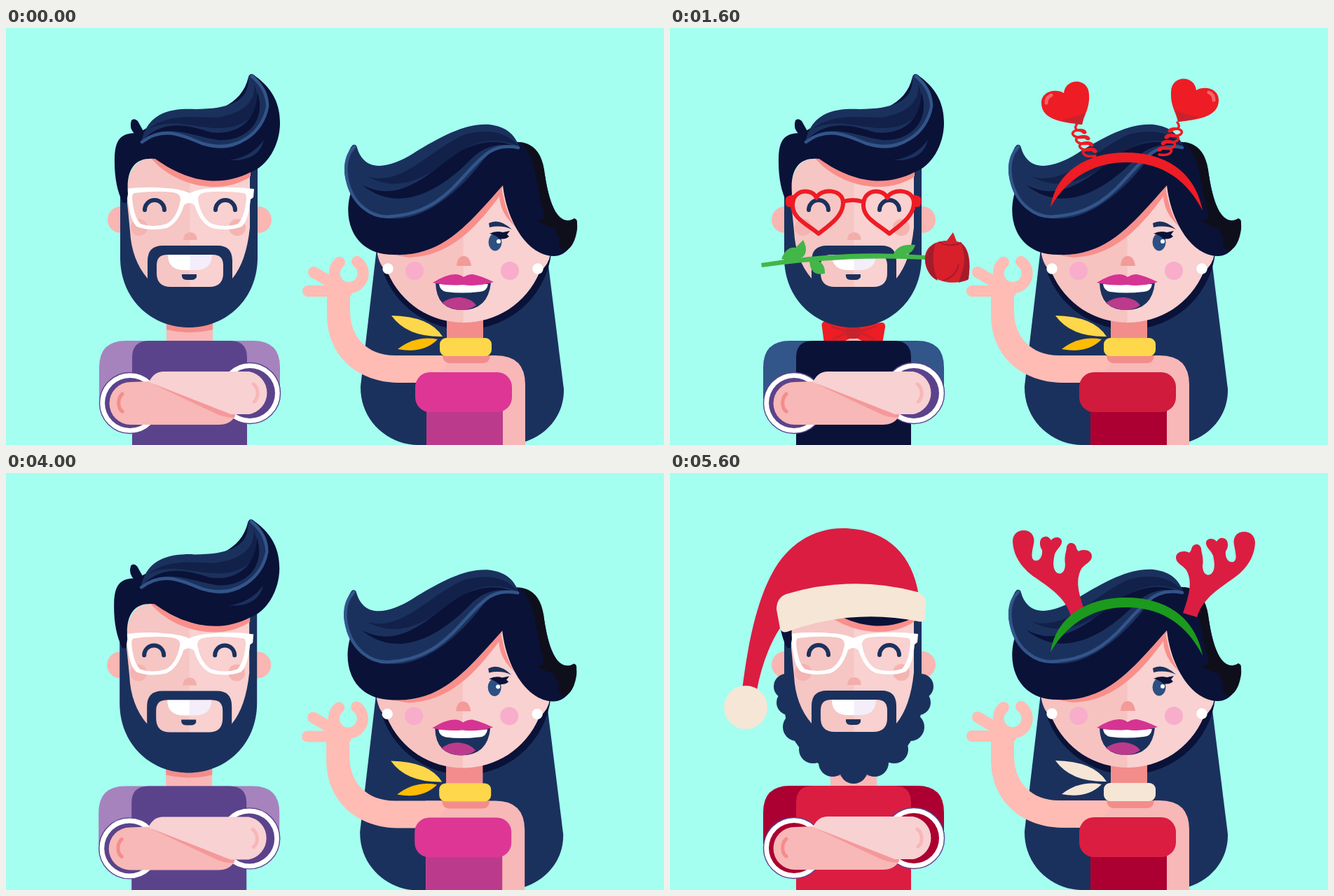
Write an HTML page that moves like this. It is 939 px wide and 596 px high and loops after 6400 ms.

```html
<!DOCTYPE html>
<html lang="en">
<head>
<meta charset="utf-8">
<title>Festive couple</title>
<style>
html, body { margin: 0; width: 100%; height: 100%; overflow: hidden; background: #a4fff0; }
svg { display: block; width: 939px; height: 596px; }
.line { fill: none; stroke-linecap: round; stroke-linejoin: round; }
.p { display: none; }
.s0 .on0, .s1 .on1, .s2 .on2, .s3 .on3, .s4 .on4, .s5 .on5 { display: inline; }
svg { --shirt: #5b438c; --sleeve: #a683bd; --cuff: #5b438c; --rim: #5b438c;
  --bust: #de3694; --dress: #bc3a8c; --scarf: #ffd74a; --scarf2: #ffbc05; --band: #ee1c24; }
.s1 { --shirt: #fff; --sleeve: #d3f5fe; --cuff: #1b315d; --rim: #1b315d; --dress: #de3694; --scarf: #00b2ae; --fold: #00b2ae; --dot: #de3694; }
.s2 { --shirt: #0a1238; --sleeve: #32558a; --bust: #d01b3c; --dress: #ab0031; }
.s3 { --shirt: #fff; --sleeve: #005b30; --bust: #fff; --dress: #e6fdff; --scarf: #f15a24; --fold: #dd4510; --dot: #f15a24; }
.s5 { --shirt: #db1d42; --sleeve: #ab0031; --cuff: #ab0031; --bust: #db1d42; --dress: #ab0031; --scarf: #f6e6d6; --scarf2: #f6e6d6; --band: #1b9a1e; }
.s1 #hair, .s3 #hair { clip-path: url(#underHat); }
.s5 #hair { clip-path: url(#underBrim); }
</style>
</head>
<body>
<svg id="stage" class="s0" viewBox="0 0 939 596">
<defs>
  <linearGradient id="skinM" gradientUnits="userSpaceOnUse" x1="262" x2="263" y1="0" y2="0"><stop stop-color="#f5c6c4"/><stop offset="1" stop-color="#f8d1d0"/></linearGradient>
  <linearGradient id="skinW" gradientUnits="userSpaceOnUse" x1="652" x2="653" y1="0" y2="0"><stop stop-color="#f6c3c1"/><stop offset="1" stop-color="#f8d1d0"/></linearGradient>
  <linearGradient id="teeth" gradientUnits="userSpaceOnUse" x1="262" x2="263" y1="0" y2="0"><stop stop-color="#fff"/><stop offset="1" stop-color="#f3eef9"/></linearGradient>
  <clipPath id="underHat"><path d="M0 160H359V300H0Z"/></clipPath>
  <clipPath id="underBrim"><path d="M0 190H359V300H0Z"/></clipPath>
  <path id="heart" d="M200 244C194 225 156 226 156 256C156 277 180 288 204 302C227 288 246 275 246 252C246 223 207 224 200 244Z"/>
  <clipPath id="lensClip"><use href="#heart"/></clipPath>
  <g id="lens">
    <use href="#heart" fill="#6b3627"/>
    <g clip-path="url(#lensClip)"><path d="M150 286L213 223H232L157 300ZM187 305L250 237V260L199 311Z" fill="#8f5743"/></g>
    <use href="#heart" fill="none" stroke="#ffd33f" stroke-width="6"/>
    <text x="170 192" y="280" font-family="Noto Sans, sans-serif" font-weight="700" font-size="44" fill="#c92f1b" stroke="#f0602a" stroke-width="1.4">12</text>
    <path class="line" d="M184.600 252V278M197 256Q200 252 205 252Q215 255 209 264L197 277H214" stroke="#ffcf5e" stroke-width="2.2" stroke-dasharray="0 4.6"/>
  </g>
  <g id="shades">
    <path class="line" d="M246 252Q260 246 274 252" stroke="#f9a62b" stroke-width="7"/>
    <use href="#lens"/><use href="#lens" x="117"/>
  </g>
  <g id="crown">
    <path d="M135 138Q160 148 176 139L183 90H188Q205 112 226 111L252 77H257L273 116Q225 162 160 177Z" fill="#ffd33f"/>
    <path d="M185 90H188Q205 112 226 111L233 147L203 163Z" fill="#ffbc05"/>
    <path d="M157 175Q222 160 271 114L277 136Q234 180 167 193Z" fill="#5e0a1e"/>
    <g fill="#fb4d5e"><circle cx="173" cy="183" r="4"/><circle cx="187" cy="180" r="5.5"/><circle cx="204" cy="174" r="6.5"/><circle cx="222" cy="166" r="6.5"/><circle cx="239" cy="156" r="6"/><circle cx="254" cy="146" r="5"/><circle cx="267" cy="134" r="4"/></g>
    <g fill="#6c0a25"><circle cx="133" cy="132" r="8.5"/><circle cx="186" cy="86" r="8.5"/><circle cx="253" cy="70" r="8.5"/></g>
    <g fill="#fff"><circle cx="187" cy="125" r="5"/><circle cx="183" cy="136" r="3"/><circle cx="246" cy="102" r="3.8"/><circle cx="241" cy="111" r="2.6"/></g>
  </g>
  <g id="rosette">
    <circle r="16.5" fill="#fff" stroke="#f9d5b5" stroke-width="9"/>
    <circle class="line" r="17.5" stroke="#f47b2a" stroke-width="7.5" stroke-dasharray="0 5.5"/>
    <circle r="13" fill="#fff"/>
    <circle r="9.5" fill="#005b30" stroke="#005b30" stroke-width="2" stroke-dasharray="2 2"/>
  </g>
  <g id="drops">
    <path d="M-7 10V18M0 12V25M7 10V18" stroke="#f5a623" stroke-width="2"/>
    <g fill="#fbb03b" stroke="#f28b1d"><circle cx="-7" cy="18" r="2.5"/><circle cy="25" r="3"/><circle cx="7" cy="18" r="2.5"/></g>
  </g>
  <g id="jewel">
    <use href="#drops"/>
    <path d="M0-26V0" stroke="#f5a623" stroke-width="3"/>
    <circle cy="-27" r="3.5" fill="#fbb03b"/><circle cy="-18" r="3.5" fill="#fbb03b"/>
    <circle class="line" r="9.3" stroke="#f59a1c" stroke-width="8.6" stroke-dasharray="0 7.3"/>
    <circle class="line" r="9.3" stroke="#ffe08a" stroke-width="4.5" stroke-dasharray="0 7.3"/>
    <circle r="5" fill="#d92c6a" stroke="#f5a623" stroke-width="2"/>
  </g>
  <g id="balloon">
    <path d="M588 138C562 135 530 132 530 107C530 90 551 86 562 93C564 71 598 70 598 96C599 115 591 124 588 138Z" fill="#ee1c24"/>
    <path d="M558 131Q580 128 592 121L588 138Q570 136 558 131Z" fill="#c8232c"/>
    <path class="line" d="M537 107Q537 99 544 96" stroke="#f4656a" stroke-width="5"/>
  </g>
  <path id="coil" class="line" d="M607 183c-17 3-24-8-10-10s13 9 5 1c-17 3-24-8-10-10s13 9 5 1c-17 3-24-8-10-10s13 9 5 1c-17 3-24-8-10-10s13 9 5 1c-9 0-10-5-6-10" stroke="#ee1c24" stroke-width="3.4"/>
  <path id="antler" fill="#db1d42" d="M572 204C565 180 545 166 522 150C501 136 490 118 489 98C489 86 498 81 506 82C517 83 521 92 519 101C517 112 514 122 520 125C528 127 532 118 531 110C526 103 527 92 535 91C540 90 542 94 544 96C548 90 558 91 559 97C560 104 552 108 549 116C547 125 545 138 553 143C560 146 564 139 564 130C562 120 566 111 566 106C568 98 576 99 579 104Q580 109 583 112C590 108 602 110 602 119C602 127 592 130 587 137C580 150 580 165 592 198Z"/>
</defs>

<g id="cast">
<g id="man">
  <g fill="#f9b6b2"><circle cx="164" cy="274" r="19"/><circle cx="360" cy="274" r="19"/></g>
  <path d="M229 410H295V448H229Z" fill="#f9b8b7"/>
  <path d="M229 410H295V431Q262 439 229 431Z" fill="#f28d8b"/>
  <g class="p on2">
    <path d="M262 428L222 419Q215 420 217 428L220 451Q240 456 262 440Q284 456 303 451L307 428Q308 420 300 421Z" fill="#ee1c24"/>
    <path d="M230 427L255 434L232 445M294 427L269 434L292 445" fill="none" stroke="#c8232c" stroke-width="3"/>
    <rect x="251" y="425" width="21" height="19" rx="7" fill="#c8232c"/>
  </g>
  <path d="M133 530V485Q133 447 171 447H353Q391 447 391 485V520H345V530Z" fill="var(--sleeve)"/>
  <path d="M180 596V471Q180 447 204 447H320Q344 447 344 471V596Z" fill="var(--shirt)"/>
  <g fill="#fff" stroke="var(--rim)" stroke-width="1.4"><circle cx="177" cy="536" r="43.5"/><circle cx="348" cy="522" r="43.5"/></g>
  <g fill="var(--cuff)"><circle cx="177" cy="536" r="36"/><circle cx="348" cy="522" r="36"/></g>
  <path d="M178 506L206 505L327 554Q321 567 303 567H178A30.500 30.500 0 0 1 178 506Z" fill="#f7b8b7"/>
  <path d="M208 508L328 550L326 557Q310 557 295 549Z" fill="#f5989a"/>
  <path d="M347 491H225Q211 491 204 506L321 552H347A31 31 0 0 0 347 491Z" fill="#f8d1d2"/>
  <path class="line" d="M166 523C159 529 159 543 166 548" stroke="#f58c8c" stroke-width="5"/>
  <path class="line" d="M353 509C361 515 361 529 354 534" stroke="#f7b7b8" stroke-width="5"/>

  <g class="p on5" fill="#1b315d"><g id="curls"><circle cx="166" cy="305" r="18"/><circle cx="170" cy="328" r="18"/><circle cx="181" cy="363" r="20"/><circle cx="204" cy="395" r="20"/><circle cx="232" cy="414" r="20"/></g><use href="#curls" transform="translate(524 0) scale(-1 1)"/><circle cx="262" cy="424" r="20"/></g>
  <path d="M163 235V328C163 388 208 428 261 428S359 388 359 328V200H300V235Z" fill="#1b315d"/>
  <path d="M173 250C170 212 180 187 208 186H348V285Q343 334 323 358H202Q179 331 177 290Z" fill="url(#skinM)"/>
  <g fill="#f4b4b1"><circle cx="190" cy="285" r="12"/><circle cx="330" cy="285" r="12"/></g>
  <path d="M202 376V333Q202 311 224 311H302Q323 311 323 333V376Z" fill="#1b315d"/>
  <path d="M215 339Q215 324 230 324H295Q310 324 310 339V350Q310 370 290 370H235Q215 370 215 350Z" fill="url(#skinM)"/>
  <path d="M231 324H294Q294 346 270 346H255Q231 346 231 324Z" fill="url(#teeth)"/>
  <path d="M251 352H272V356Q270 360 265 360H258Q252 360 251 355Z" fill="#1b315d"/>
  <path d="M253 303Q254 292 263 292T273 303Z" fill="#f3aeab"/>
  <path class="line" d="M198 260A14 14 0 0 1 226 260M299 260A14 14 0 0 1 327 260" stroke="#1b315d" stroke-width="6"/>
  <path class="p on1" d="M258 205Q262 207 262 218Q266 230 262 236Q258 239 254 235Q251 229 255 217Z" fill="#d9173c"/>
  <path class="p on0 on1 on3 on5" fill="#fff" fill-rule="evenodd" d="M169 230Q200 226 230 229Q249 230 262 236Q274 230 293 229Q323 226 354 230L353 242L349 245Q346 276 336 284Q318 291 294 286Q277 279 269 253Q262 247 254 253Q246 279 229 286Q205 291 187 284Q177 276 174 245L170 242ZM183 236Q215 232 239 235Q250 237 249 246Q244 272 229 280Q210 286 192 280Q182 270 180 243Q180 237 183 236ZM340 236Q308 232 284 235Q273 237 274 246Q279 272 294 280Q313 286 331 280Q341 270 343 243Q343 237 340 236Z"/>

  <g id="hair">
    <path d="M207 186C238 224 306 242 349 212V185Z" fill="#f98f8b"/>
    <path d="M179 132Q183 128 188 133L197 149Q196 158 184 152Q175 143 179 132Z" fill="#0a1238"/>
    <path d="M167 250Q154 225 155 185C156 160 163 149 190 150C225 120 330 140 346 70Q349 62 356 69C382 88 391 110 391 136C391 167 373 198 349 206C308 227 262 222 213 187C186 184 171 199 174 237L172 250Z" fill="#0a1238"/>
    <path d="M193 165C200 122 234 114 270 116C320 116 348 104 346 70Q349 63 355 69C377 90 376 130 350 154C310 189 282 164 255 155Q219 144 193 165Z" fill="#1b315d"/>
    <path d="M202 145C232 121 268 128 299 128C342 123 357 102 354 80C369 114 349 137 318 142C277 148 239 125 202 145Z" fill="#122149"/>
    <path d="M197 158C227 130 261 139 292 149C331 154 358 132 359 92C372 134 342 163 302 160C264 154 232 136 197 158Z" fill="#0a1238"/>
    <path class="line" d="M194 163C227 138 256 156 280 165C328 180 367 150 373 112Q373 87 351 69" stroke="#32558a" stroke-width="4.500"/>
    <path d="M318 189Q350 185 368 160Q361 191 318 189Z" fill="#1b315d"/>
  </g>

  <g class="p on1">
    <path d="M338 112Q368 102 371 128C371 162 365 200 356 225C328 222 296 210 270 195L310 150Z" fill="#f15a24"/>
    <path d="M238 98C256 75 276 68 297 69C321 73 335 85 343 94L318 110H250Z" fill="#f15a24"/>
    <path d="M144 152C142 116 160 91 186 88C212 88 228 99 252 102C285 102 310 108 336 109Q346 125 322 153Q288 191 246 206Q213 214 175 217Q150 188 144 152Z" fill="#f78f1f"/>
    <path class="line" d="M149 125Q185 119 213 95M149 154Q213 144 247 106M152 181Q244 158 290 108M166 206Q270 180 325 113" stroke="#f15a24" stroke-width="3.500"/>
    <path class="line" d="M342 125Q354 120 365 129M340 143Q354 139 367 150M329 157Q348 156 363 169M317 170Q339 172 361 185M302 180Q329 190 357 198M288 191Q317 204 352 213M257 89L265 101M268 80L277 102M286 77L288 102M304 83L297 103M323 88L308 104" stroke="#f78f1f" stroke-width="4.500"/>
  </g>

  <g class="p on2">
    <g class="line" stroke="#ee1c24" stroke-width="6">
      <path id="frame" d="M209 243C204 229 175 229 175 253C175 272 195 280 212 294C230 280 247 268 247 250C247 229 214 229 209 243Z"/><use href="#frame" x="101"/>
      <path d="M248 248Q261 244 274 248"/>
    </g>
    <path d="M165 243Q170 238 178 239L176 255Q166 258 165 251ZM358 243Q353 238 346 239L348 255Q357 258 358 251Z" fill="#ee1c24"/>
    <path d="M130 336Q250 316 365 325V331Q250 325 131 342Z" fill="#42b649"/>
    <path d="M159 330Q166 312 179 314L190 303Q198 318 190 327Q175 335 159 330ZM199 330Q222 331 221 351Q199 356 199 330ZM319 323Q325 308 350 310Q345 329 319 323Z" fill="#42b649"/>
    <path d="M364 333C362 312 380 304 395 304L404 292L409 305C427 307 431 337 425 360C402 369 366 363 364 333Z" fill="#d8202b"/>
    <path d="M379 307Q365 316 364 333Q367 354 382 361Q371 334 379 307ZM415 307Q431 322 426 359L412 364L417 347Q424 330 415 307Z" fill="#a61b2b"/>
    <path d="M384 306Q398 314 416 307M390 361Q408 355 412 338" fill="none" stroke="#a61b2b" stroke-width="2"/>
  </g>

  <g class="p on3">
    <path d="M159 166C161 139 172 115 188 99L262 90L346 107C354 122 357 145 357 167Q306 173 260 186Q213 169 159 166Z" fill="#ebffff" stroke="#a9ecfb" stroke-width="5" stroke-linejoin="round"/>
    <path d="M184 102L261 114L345 110" fill="none" stroke="#a9ecfb" stroke-width="4"/>
    <path d="M260 114L262 114L260 185Q256 145 260 114Z" fill="#155a70"/>
    <use href="#rosette" x="323" y="140"/>
  </g>

  <g class="p on4">
    <use href="#crown"/><use href="#shades"/>
    <path d="M158 240Q145 238 145 248T156 259ZM364 240Q377 238 377 248T366 259Z" fill="#ffd33f"/>
    <path class="line" d="M151 248V252M371 248V252" stroke="#fff" stroke-width="4"/>
  </g>

  <g class="p on5">
    <path d="M103 310C109 260 121 188 146 143C167 103 204 79 246 79C308 79 346 115 355 175L158 220C141 246 130 278 124 310Z" fill="#db1d42"/>
    <path d="M152 195Q152 178 166 173Q260 145 353 170Q367 175 365 190L364 209Q361 214 354 212Q260 193 167 227Q159 229 157 222Z" fill="#f6e6d6"/>
    <circle cx="108" cy="335" r="31" fill="#f6e6d6"/>
  </g>
</g>

<g id="woman">
  <path d="M529 315L506 512C505 562 546 596 588 596H712C757 596 797 563 796 516L771 315Z" fill="#1b315d"/>
  <g class="p on1 on3">
    <path d="M440 534C478 553 540 548 600 529V596H434L424 566Z" fill="var(--scarf)"/>
    <path d="M709 548C755 577 813 574 860 555L868 596H709Z" fill="var(--scarf)"/>
    <path d="M600 541Q565 584 500 596H560Q590 588 600 575Z" fill="#1b315d"/>
  </g>
  <g class="p on3">
    <path d="M440 533Q448 534 450 542L442 596H432Q434 581 419 567Q416 556 430 552Q430 537 440 533ZM864 554Q854 556 853 568L860 596H875Q881 587 879 577L868 571Z" fill="#f15a24"/>
    <path class="line" d="M448 559Q520 569 594 541M452 575Q530 581 594 551M457 589Q525 593 577 568M746 576Q800 584 850 573M748 589Q800 594 855 586" stroke="#dd4510" stroke-width="4"/>
  </g>
  <g class="p on1 line">
    <path id="trim" d="M441 537Q446 543 439 548Q429 550 433 556Q421 552 423 562Q436 575 433 594M859 557Q866 564 862 572Q872 575 876 578Q869 585 872 594" stroke="#fbc52d" stroke-width="10"/>
    <path d="M441 537Q446 543 439 548Q429 550 433 556Q421 552 423 562Q436 575 433 594M859 557Q866 564 862 572Q872 575 876 578Q869 585 872 594" stroke="#fff06a" stroke-width="8" stroke-dasharray="1 9" stroke-linecap="butt"/>
  </g>
  <circle cx="655" cy="307" r="124" fill="#0a1238"/>
  <path d="M629 400H681V470H629Z" fill="#f9b8b7"/>
  <path d="M629 400H681V443H629Z" fill="#f28d8b"/>
  <path d="M600 468H699Q741 468 741 510V596H600Z" fill="#f7b8b7"/>
  <path d="M458 366V410C458 470 504 507 560 507H604L640 468H555C515 468 491 441 491 405V366Z" fill="#ffbcb4"/>
  <g class="line" stroke="#ffbcb4">
    <path d="M476 335A20.500 20.500 0 1 0 501 334" stroke-width="16"/>
    <path d="M439 349L466 365M431 376H470" stroke-width="16"/>
    <path d="M466 367L472 380L487 378" stroke-width="14"/>
  </g>
  <path d="M623 468H691Q690 479 681 479H633Q624 479 623 468Z" fill="#f28d8b"/>
  <path d="M600 540H709V596H600Z" fill="var(--dress)"/>
  <rect x="584" y="492" width="138" height="57" rx="21" fill="var(--bust)"/>
  <g class="p on0 on2 on4 on5">
    <rect x="619" y="443" width="74" height="26" rx="9" fill="var(--scarf)"/>
    <path d="M623 441Q605 412 550 411Q572 442 623 441Z" fill="var(--scarf)"/>
    <path d="M616 445Q585 439 559 459Q595 466 616 445Z" fill="var(--scarf2)"/>
  </g>
  <g class="p on1 on3">
    <path d="M621 444H687L691 455L701 468H608L618 456Z" fill="var(--scarf)"/>
    <path d="M617 456Q655 463 692 455M613 465Q655 470 696 464" fill="none" stroke="var(--fold)" stroke-width="3"/>
  </g>
  <path d="M530 300V323Q534 342 544 348C564 395 607 421 653 421S742 395 762 348Q775 338 777 322V290L707 210L560 300Z" fill="url(#skinW)"/>
  <g fill="#f8adcb"><circle cx="583" cy="347" r="13"/><circle cx="719" cy="347" r="13"/></g>
  <path d="M643 340Q644 326 653 326T664 340Z" fill="#f39b98"/>
  <path d="M613 364Q650 372 692 364Q688 403 651 403T613 364Z" fill="#1b315d"/>
  <path d="M618 366H688Q686 377 676 377Q650 380 628 377Q619 375 618 366Z" fill="#fff"/>
  <path d="M622 393Q634 384 649 385Q664 387 671 396Q663 403 649 403Q633 402 622 393Z" fill="#bc3a8c"/>
  <path d="M609 364Q628 352 641 352Q648 352 653 356Q659 352 666 352Q677 354 696 363Q673 370 652 367Q630 369 609 364Z" fill="#d53492"/>
  <g class="p on0 on1 on2 on3 on5">
    <ellipse cx="698" cy="306" rx="9.500" ry="12.500" fill="#2d5083"/><circle cx="703" cy="305" r="3" fill="#fff"/>
    <path d="M690 294Q699 289 709 292L719 290L715 295L718 298Q712 303 704 301Q697 295 690 294Z" fill="#0a1238"/>
    <ellipse cx="612" cy="308" rx="9" ry="11" fill="#2d5083"/>
  </g>
  <path d="M689 279Q704 271 722 288Q707 281 690 285Z" fill="#1b315d"/>
  <circle class="p on1 on3" cx="652" cy="290" r="10" fill="var(--dot)"/>
  <use class="p on4" href="#shades" x="390" y="43"/>
  <path d="M540 322L555 324C625 327 663 276 709 225L706 238C672 284 635 326 575 328ZM707 227Q714 268 727 284Q705 265 704 240Z" fill="#f98f8b"/>
  <path d="M492 235C480 275 496 325 555 324C625 327 663 276 709 225C715 278 745 326 782 326C799 326 813 309 814 285Q817 272 811 273C790 282 777 260 769 210Q762 167 732 163L650 160Z" fill="#0a1238"/>
  <path d="M733 163Q765 166 769 210C776 260 791 285 811 272Q816 273 815 288C812 308 805 316 798 318Q785 315 790 302Q783 291 784 287Q770 284 757 275Q771 277 767 261C757 235 758 180 733 163Z" fill="#0f0f1c"/>
  <g>
    <path d="M501 171C512 209 549 199 580 180C622 154 656 136 690 138C716 141 728 155 733 172Q703 161 680 190C635 249 575 289 525 266C494 251 477 213 485 190Q490 171 495 167Q500 166 501 171Z" fill="#1b315d"/>
    <path d="M515 212C565 228 605 173 655 152Q706 139 732 169Q690 151 650 175C605 210 565 239 515 212Z" fill="#122149"/>
    <path d="M508 224C565 254 605 204 650 175Q690 154 726 169Q689 160 661 190C612 240 555 263 508 224Z" fill="#0a1238"/>
    <path class="line" d="M497 170Q482 185 486 212C492 251 522 274 553 269C625 263 649 210 681 184Q701 165 731 171" stroke="#32558a" stroke-width="4.500"/>
  </g>
  <use class="p on4" href="#lens" x="507" y="43"/>
  <g class="p on0 on2 on4 on5" fill="#fff"><circle cx="545" cy="344" r="7.700"/><circle cx="759" cy="344" r="7.700"/></g>
  <g class="p on1"><use href="#jewel" x="548" y="366"/><use href="#jewel" x="758" y="366"/></g>
  <g class="p on3">
    <use href="#drops" x="546" y="363"/><use href="#drops" x="757" y="363"/>
    <use href="#rosette" x="546" y="355"/><use href="#rosette" x="757" y="355"/>
  </g>
  <g class="p on2">
    <use href="#coil"/><use href="#coil" transform="translate(1305 -2) scale(-1 1)"/>
    <use href="#balloon"/><use href="#balloon" transform="translate(1313 -4) scale(-1 1)"/>
  </g>
  <g class="p on5"><use href="#antler"/><use href="#antler" transform="translate(1324 2) scale(-1 1)"/></g>
  <path class="p on2 on5" d="M543 256C551 205 595 178 651 178S750 206 760 261C735 211 695 192 651 192C610 192 570 210 543 256Z" fill="var(--band)"/>
  <use class="p on4" href="#crown" transform="translate(540 153) rotate(9.7) scale(.81) translate(-133 -132)"/>
</g>
</g>
</svg>
<script>
const STEP = 800;
const outfits = [0, 1, 2, 0, 3, 0, 4, 5];
const stage = document.getElementById('stage');
const cast = document.getElementById('cast');
let shown = -1;

function tick() {
  const step = Math.floor(performance.now() / STEP) % outfits.length;
  if (step !== shown) {
    shown = step;
    stage.setAttribute('class', 's' + outfits[step]);
    // the pair sits slightly to the left during the middle steps
    cast.setAttribute('transform', step > 2 && step < 7 ? 'translate(-.8 .4)' : '');
  }
  requestAnimationFrame(tick);
}
tick();
</script>
</body>
</html>
```
